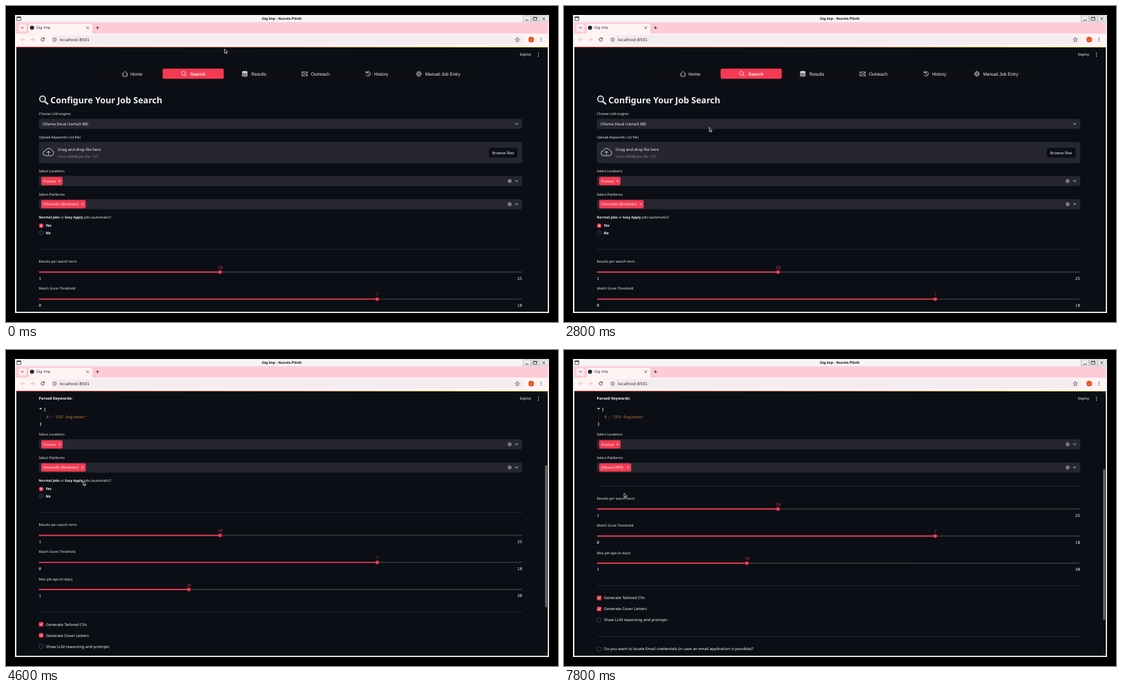
An HTML page that plays this animation: 800x458 px, repeating every 8000 ms.

```html
<!DOCTYPE html>
<html lang="en">
<head>
<meta charset="utf-8">
<title>Job search setup</title>
<style>
  html, body { margin: 0; width: 100%; height: 100%; overflow: hidden; background: #000; }
  svg { display: block; width: 100vw; height: 100vh; }
  text { font-family: "Noto Sans", sans-serif; text-rendering: geometricPrecision; white-space: pre; }
  .ui { font-family: "DejaVu Sans", sans-serif; }
  .menu { font-family: "Liberation Sans", Arial, sans-serif; }
  .mono { font-family: "Noto Sans Mono", monospace; }
  .bold { font-weight: 700; }
  .semi { font-weight: 600; }
  .italic { font-weight: 700; font-style: italic; }
</style>
</head>
<body>
<svg id="stage" viewBox="0 0 800 458" preserveAspectRatio="none"></svg>
<script>
const BG = '#0b0e15', PANEL = '#25262f', RED = '#f43a52', WHITE = '#f2f2f4', GREY = '#8b8c94', INK = '#33282c';
const BODY = 5.72, LABEL = 4.95;

// Drawing helpers; text is placed by its vertical centre.
const text = (x, y, str, { size = BODY, fill = WHITE, cls = '', anchor = 'start' } = {}) =>
  `<text x="${x}" y="${y + size * .35}" font-size="${size}" fill="${fill}" class="${cls}" text-anchor="${anchor}">${str}</text>`;
const rect = (x, y, w, h, fill, r = 0, extra = '') =>
  `<rect x="${x}" y="${y}" width="${w}" height="${h}" rx="${r}" fill="${fill}" ${extra}/>`;
const circle = (x, y, r, fill, extra = '') => `<circle cx="${x}" cy="${y}" r="${r}" fill="${fill}" ${extra}/>`;
const line = (d, stroke = WHITE, width = .7, fill = 'none') =>
  `<path d="${d}" fill="${fill}" stroke="${stroke}" stroke-width="${width}" stroke-linecap="round" stroke-linejoin="round"/>`;
const group = (id, ...parts) => `<g id="${id}">${parts.join('')}</g>`;
const label = (y, str) => text(47.6, y, str, { size: LABEL });
const cross = (x, y, r, color, width = .7) =>
  line(`M${x - r} ${y - r}l${2 * r} ${2 * r}m0 ${-2 * r}l${-2 * r} ${2 * r}`, color, width);
const chevron = (x, y, color = WHITE, r = 1.7) => line(`M${x - r} ${y - r / 2}l${r} ${r}l${r} ${-r}`, color, .9);
const dots = (x, y, color) => [-2.4, 0, 2.4].map(d => circle(x, y + d, .65, color)).join('');
const divider = y => rect(47.6, y - .3, 700.6, .6, '#33353d');
const field = y => rect(47.6, y - 7.4, 700.6, 14.8, PANEL, 3) + chevron(740, y);
const clearIcon = y => circle(730, y, 2.7, '#8f9097') + cross(730, y, .9, PANEL, .6);
const pill = (y, w, str) => rect(51, y - 6, w, 12, RED, 2) + text(54, y, str) + cross(51 + w - 4.6, y, 1.1, WHITE, .75);

function slider(y, title, min, max, value, x) {
  const num = { size: 5.9, cls: 'mono' };
  return label(y, title)
    + text(x, y + 8.5, value, { ...num, fill: '#d8334a', anchor: 'middle' })
    + rect(47.6, y + 14.2, 700.6, 1.7, '#35363d', .8)
    + rect(47.6, y + 14.2, x - 47.6, 1.7, RED, .8)
    + circle(x, y + 15.1, 2.6, RED)
    + text(47.6, y + 24.2, min, num) + text(748, y + 24.2, max, { ...num, anchor: 'end' });
}

function checkbox(y, str, on) {
  const box = on
    ? rect(47.7, y - 3.2, 6.4, 6.4, RED, 1.3) + line(`M49.3 ${y}l1.2 1.3l2.2-2.6`, WHITE, .9)
    : rect(48, y - 2.9, 5.8, 5.8, BG, 1.2, 'stroke="#5b5c65" stroke-width=".6"');
  return box + text(58, y, str);
}

function radio(y, str, on) {
  return (on ? circle(51, y, 3.2, RED) + circle(51, y, 1.15, WHITE)
             : circle(51, y, 2.9, '#15181f', 'stroke="#4b4c55" stroke-width=".6"'))
    + text(57.4, y, str, { size: 5.5, cls: 'italic' });
}

function browserFrame() {
  const windowButton = (x, glyph) => rect(x + .3, 14, 11.2, 8.8, '#ececec', 0, 'stroke="#999" stroke-width=".5"') + line(glyph, '#222', .8);
  return rect(13, 13, 774, 432, '#f4f4f4')
    + rect(14.5, 23.5, 771, 17.5, '#fdcbd6')
    + rect(14.5, 40, 771, 19, '#fff3f4')
    + rect(15.8, 16, 5.6, 5, '#fff', 0, 'stroke="#222" stroke-width=".7"') + rect(15.8, 15.6, 5.6, 1.6, '#222')
    + text(399.5, 18.4, 'Gig Imp - Nuvola Plinth', { size: 5.25, fill: '#111', cls: 'menu bold', anchor: 'middle' })
    + windowButton(749, 'M753 20.5h4') + windowButton(761.3, 'M764.5 16.2h5v4.4h-5zM764.5 17h5')
    + windowButton(773.6, 'M777.4 16.5l3.8 3.8m0-3.8l-3.8 3.8')
    + rect(18, 26, 11.5, 11, '#ffe9ee', 3) + chevron(23.7, 31.6, INK, 1.4)
    + line('M30.5 40.4Q33 40 33 37V28.5Q33 25.7 36 25.7H122Q125 25.7 125 28.5V37Q125 40 127.5 40.4z', 'none', 0, '#fff3f4')
    + circle(37.7, 31.5, 3, '#24262b')
    + text(44, 31.5, 'Gig Imp', { size: 5.1, fill: INK, cls: 'ui' })
    + cross(118.4, 31.5, 1.4, INK) + line('M130.6 31.5h4m-2-2v4', INK, .8)
    + line('M27 48.7h-5m2.2-2.2l-2.2 2.2l2.2 2.2M36 48.7h5m-2.2-2.2l2.2 2.2l-2.2 2.2', '#c9b6bb', .8)
    + line('M55.3 47.4a2.4 2.4 0 1 0 .2 1.9M55.5 45.8v1.8h-1.8', INK, .8)
    + rect(64.5, 42.2, 686, 13.2, '#f6ecef', 6.6)
    + circle(70.5, 48.8, 2.5, 'none', `stroke="${INK}" stroke-width=".6"`) + line('M70.5 48.6v1.4M70.5 47.4v.1', INK, .6)
    + text(78, 48.8, 'localhost:8501', { size: 5.85, fill: INK, cls: 'ui' })
    + line('M741 45.9l.9 1.9 2.1.3-1.5 1.5.3 2.1-1.8-1-1.8 1 .3-2.1-1.5-1.5 2.1-.3z', INK, .6)
    + circle(761.2, 48.7, 4.1, '#e9541f') + text(761.2, 48.7, 'a', { size: 3.6, anchor: 'middle' })
    + dots(775.5, 48.7, INK);
}

function menuBar() {
  const y = 98.4, item = (x, str, cls = '') => text(x, y, str, { size: 6.58, cls: 'menu ' + cls });
  const teeth = Array.from({ length: 8 }, (_, i) => {
    const a = i * Math.PI / 4, c = Math.cos(a), s = Math.sin(a);
    return `M${598.4 + 2.9 * c} ${y + 2.9 * s}L${598.4 + 3.6 * c} ${y + 3.6 * s}`;
  }).join('');
  return rect(132, 90.6, 536, 15.2, '#0e0f12', 2)
    + rect(227, 90.8, 88.6, 14.8, RED, 2)
    + line('M168.6 98.6l3.9-3.9l3.9 3.9M169.6 97.8v4.2h5.8v-4.2')
    + circle(257.2, 97.6, 2.8, 'none', `stroke="${WHITE}" stroke-width=".8"`) + line('M259.3 99.7l2.3 2.3', WHITE, 1)
    + line('M343 95h6.4v6.8h-6.4zM343 97.4h6.4m-6.4 2.2h6.4M345.1 95v6.8m2.2-6.8v6.8') + rect(343, 94.8, 6.4, 1.8, WHITE)
    + line('M429.2 95.6h7.4v5.6h-7.4zl3.7 3.1l3.7-3.1M429.2 101.2l2.9-2.6m4.5 2.6l-2.9-2.6', WHITE, .6)
    + line('M521.9 96.4a3.4 3.4 0 1 1-.2 3.4M521.5 94.7l.3 2h2M524.8 96.3v2.4l1.6 1')
    + circle(598.4, y, 2.8, 'none', `stroke="${WHITE}" stroke-width=".7"`) + circle(598.4, y, 1.1, 'none', `stroke="${WHITE}" stroke-width=".6"`) + line(teeth, WHITE, 1)
    + item(180.2, 'Home') + item(267, 'Search', 'bold') + item(355.4, 'Results')
    + item(441.8, 'Outreach') + item(533.6, 'History') + item(607.4, 'Manual Job Entry');
}

function heading() {
  return line('M56.6 138.8l3.7 3', '#c9ced3', 2.4)
    + circle(53, 134.8, 4.2, '#20262e', 'stroke="#eceff1" stroke-width="1.5"')
    + text(64.2, 136.4, 'Configure Your Job Search', { size: 12.55, cls: 'semi' });
}

function engineAndUpload() {
  return label(156.4, 'Choose LLM engine:') + field(170.9) + text(52.8, 170.9, 'Ollama (local Llama3-8B)')
    + label(190, 'Upload Keywords (.txt file)')
    + rect(47.6, 197, 700.6, 31, PANEL, 3)
    + line('M57.5 217a3.6 3.6 0 0 1-.4-7.2a5 5 0 0 1 9.3-.6a4 4 0 0 1-.4 7.8zM61.5 215v-4.5m-2 2l2-2.2l2 2.2', '#c3c4c9', 1)
    + text(75, 208.4, 'Drag and drop file here')
    + text(75, 217.8, 'Limit 200MB per file • TXT', { size: LABEL, fill: GREY })
    + rect(699.3, 205, 42.4, 15.2, BG, 3, 'stroke="#34353e" stroke-width=".5"')
    + text(720.5, 212.5, 'Browse files', { anchor: 'middle' });
}

function uploadedFile() {
  const code = { size: 5.72, cls: 'mono' };
  return line('M58 236.6h4.2l2.6 2.6v5.6h-6.8zM62.2 236.6v2.6h2.6', '#d5d5d9', .8)
    + text(75, 240.4, 'keywords_1.txt') + text(119, 240.4, '13.0B', { size: LABEL, fill: GREY })
    + cross(738, 240.8, 1.8, WHITE, .8)
    + text(47.6, 262.3, 'Parsed Keywords:', { size: 5.55, cls: 'bold' })
    + line('M48.8 276.3h3l-1.5 1.8z', WHITE, .4, WHITE) + text(54.4, 278.2, '[', { ...code, cls: 'mono bold' })
    + rect(50.3, 282.5, .4, 12, '#34363f')
    + text(58.4, 288.6, '0', { ...code, fill: '#b5762f' }) + text(63.8, 288.6, ':', { ...code, fill: '#c9c9cc' })
    + text(69, 288.6, '"CFD Engineer"', { ...code, fill: '#c98224' })
    + text(48.6, 298.5, ']', { ...code, cls: 'mono bold' });
}

function optionList() {
  const options = ['Jobava', 'Jobava (API)', 'Stafflune (Browser)', 'Stafflune (API)', 'Hirevado (API)', 'Hirevado (Browser)', 'Rolevia (Browser)'];
  return rect(47.6, 295, 700.6, 113, BG) + rect(47.6, 295.4, 700.6, 16, '#1b1d26') + rect(47.6, 311.4, 700.6, 16, '#161921')
    + options.map((name, i) => text(54, 303.4 + 16 * i, name)).join('');
}

function cursors() {
  return group('arrow', line('M0 0v5.7l1.4-1.2l1 2.2l1-.4l-1-2.2h1.8z', '#f4f4f4', .65, '#111'))
    + group('beam', line('M-1.2-3h2.4M0-3v6M-1.2 3h2.4', '#e8e8e8', .8))
    + group('hand', line('M0 .5q.6-.8 1.2 0l1 2l2 .2q1 .4.9 1.6l-.4 2.3h-2.7l-2.6-2.7q0-.9 1-.5z', '#222', .4, '#f4f4f4'));
}

document.getElementById('stage').innerHTML = `
  <defs>
    <clipPath id="viewport"><rect x="15" y="59" width="770.2" height="384.2"/></clipPath>
    <linearGradient id="accent"><stop stop-color="#ff4b4b"/><stop offset="1" stop-color="#fffd80"/></linearGradient>
  </defs>`
  + rect(0, 0, 800, 458, '#000') + browserFrame() + rect(15, 59, 770.2, 384.2, BG)
  + `<g clip-path="url(#viewport)">`
  + group('page', menuBar(), heading(), engineAndUpload(), group('uploaded', uploadedFile()),
    group('settings',
      label(239.2, 'Select Locations'), field(253.7), clearIcon(253.7), pill(253.7, 31, 'France'),
      label(272.9, 'Select Platforms'), field(287.3),
      group('firstPlatform', clearIcon(287.3), pill(287.3, 64.6, 'Hirevado (Browser)')),
      group('newPlatform', clearIcon(287.3), pill(287.3, 46.4, 'Jobava (API)')),
      group('emptyPlatform', rect(47.9, 280.2, 700, 14.2, 'none', 3, `stroke="${RED}" stroke-width=".7"`),
        text(52.4, 287.3, 'Choose an option', { fill: '#a0a1a8' })),
      group('applyMode',
        label(306.6, '<tspan class="bold">Normal jobs</tspan> or <tspan class="bold">Easy Apply</tspan> jobs (automatic)?'),
        radio(318.4, 'Yes', true), radio(328.6, 'No', false)),
      group('filters',
        divider(352.8),
        slider(370.5, 'Results per search term', 1, 25, 10, 310.2),
        slider(409.7, 'Match Score Threshold', 0, 10, 7, 538),
        slider(449, 'Max job age (in days)', 1, 30, 10, 265),
        divider(496.7),
        checkbox(514.5, 'Generate Tailored CVs', true),
        checkbox(530.5, 'Generate Cover Letters', true),
        checkbox(546.5, 'Show LLM reasoning and prompts', false),
        divider(570.7),
        checkbox(588.5, 'Do you want to locate Email credentials (in case an email application is possible)?', false)),
      group('options', optionList())))
  + group('scrollbar', '<rect id="thumb" x="781.4" width="2.8" rx="1.2" fill="#6c6d74"/>',
      line('M782 62l.9-1l.9 1zM782 440.6l.9 1l.9-1z', '#6c6d74', .3, '#6c6d74'))
  + rect(15, 59, 770.2, .9, 'url(#accent)')
  + text(744.4, 70.4, 'Deploy', { size: 5.15 }) + dots(771.6, 70.5, WHITE)
  + '</g>' + group('pointer', cursors());

const LOOP = 8000, STEP = 200;
const UPLOAD = 3200, CLEAR = 5800, COLLAPSE = 6000, PICK = 7000;
const pointerPath = [
  [0, 316.6, 62.6], [1800, 281.6, 80.2], [3600, 159.6, 245], [4000, 100.7, 207.8], [5200, 122.4, 173.5],
  [5400, 122.4, 173.5], [5800, 110.5, 170], [6400, 78.6, 188.6], [6900, 72, 202], [7800, 87, 207.8], [LOOP, 87, 207.8]
];

const el = id => document.getElementById(id);
const show = (id, on) => el(id).setAttribute('display', on ? 'inline' : 'none');
const move = (id, x, y) => el(id).setAttribute('transform', `translate(${x} ${y})`);
const ease = p => { p = Math.min(1, Math.max(0, p)); return p * p * (3 - 2 * p); };

function pointerAt(t) {
  const i = pointerPath.findIndex(([time]) => time > t);
  const [t0, x0, y0] = pointerPath[i - 1], [t1, x1, y1] = pointerPath[i];
  const p = ease((t - t0) / (t1 - t0));
  return [x0 + (x1 - x0) * p, y0 + (y1 - y0) * p];
}

function render(t) {
  const scroll = 192 * ease((t - 3600) / 800);
  const uploaded = t >= UPLOAD, collapsed = t >= COLLAPSE, choosing = t >= CLEAR && t < PICK;
  move('page', 0, -scroll);
  move('settings', 0, uploaded ? 75 : 0);
  move('filters', 0, collapsed ? -38.2 : 0);
  show('uploaded', uploaded);
  show('applyMode', !collapsed);
  show('firstPlatform', t < CLEAR);
  show('emptyPlatform', choosing);
  show('options', choosing);
  show('newPlatform', t >= PICK);

  show('scrollbar', uploaded && !choosing);
  el('thumb').setAttribute('y', 63 + scroll * (collapsed ? .573 : .542));
  el('thumb').setAttribute('height', collapsed ? 218 : 206);

  const beam = t >= 5200 && t < 5600, hand = t >= 5600 && t < 7200;
  show('beam', beam);
  show('hand', hand);
  show('arrow', !beam && !hand);
  move('pointer', ...pointerAt(t));
}

function tick() {
  render(Math.floor(performance.now() % LOOP / STEP) * STEP);
  requestAnimationFrame(tick);
}
tick();
</script>
</body>
</html>
```
